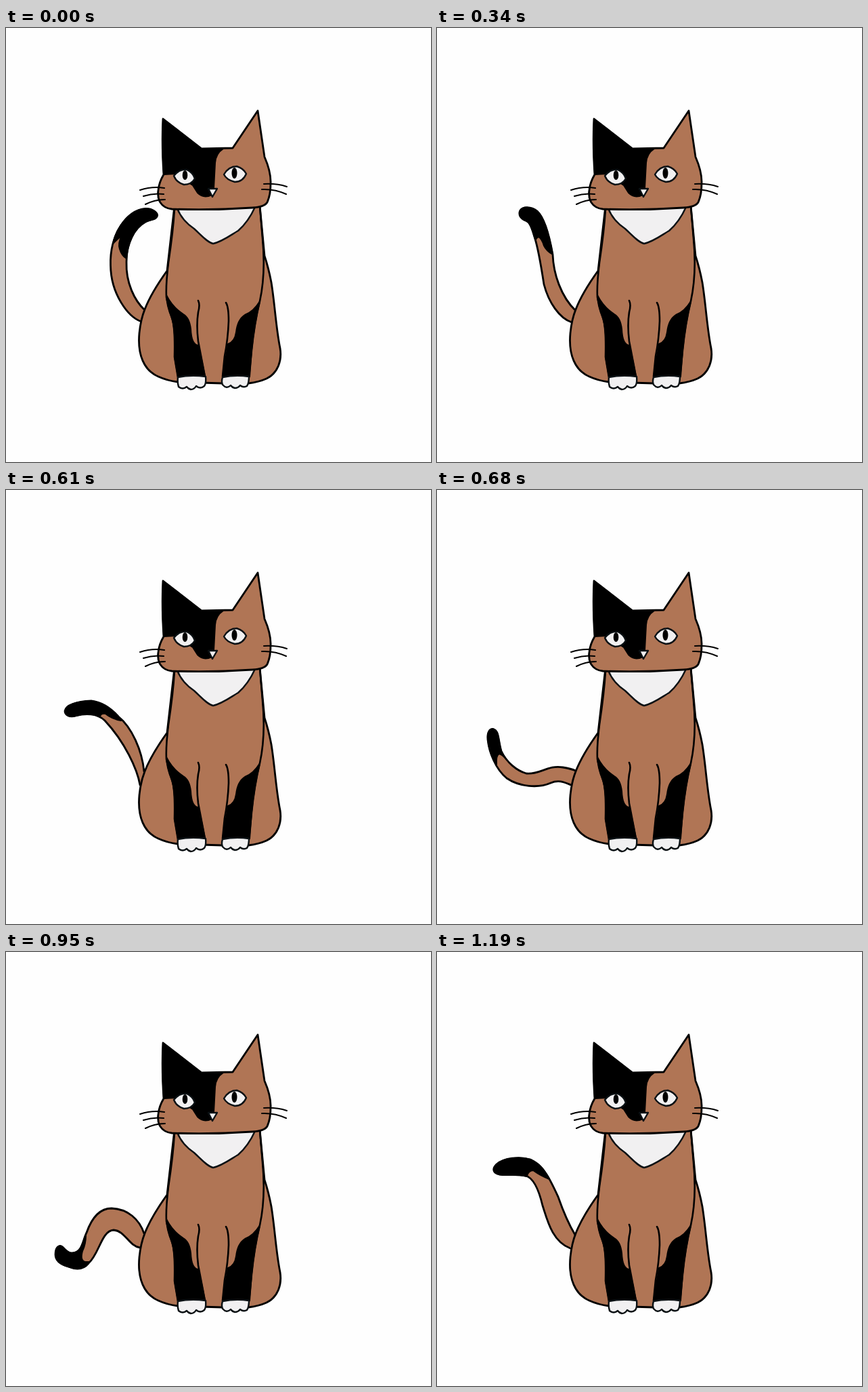
These frames come from a looping animation (628 by 640 pixels, 1360 ms). An HTML page:

```html
<!DOCTYPE html>
<html lang="en">
<head>
<meta charset="utf-8">
<title>Cat wagging its tail</title>
<style>
  html, body { margin: 0; width: 100%; height: 100%; overflow: hidden; background: #fefefe; }
  svg { display: block; width: 100%; height: 100%; }
  path { stroke-linecap: round; stroke-linejoin: round; }
  .fur { fill: #b07555; stroke: #000; stroke-width: 2.8; }
  .dark { fill: #000; stroke: #000; stroke-width: 2; }
  .white { fill: #f1f0f1; stroke: #0b1114; stroke-width: 2.4; }
  .line { fill: none; stroke: #000; stroke-width: 2.6; }
  .tail { display: none; }
</style>
</head>
<body>
<svg viewBox="0 0 628 640">
  <!-- tail poses -->
  <g class="tail">
    <path class="fur" d="M200,433 C180,426 155,392 154.500,350 C153,306 178,268 206,266.500 C216,266 224,272 223.500,277 C222,283 213,282 206,286 C188,296 178,318 178,345 C177,376 190,402 205,416"/>
    <path class="dark" d="M158,318 Q164,312 171,306 Q165,318 168,326 Q171,336 178,340 C180,318 189,296 206,286 C213,282 222,283 223.500,277 C224,272 216,266 206,266.500 C184,268 163,292 158,318Z"/>
  </g>
  <g class="tail">
    <path class="fur" d="M199,434 C181,428 165,405 158,378 C154,352 150,326 144,308 C140,294 137,286 131,284 C123,281 120,275 123,269 C127,263 139,263 148,270 C159,280 166,306 171,334 C172,362 183,396 205,417"/>
    <path class="dark" d="M145.500,313 Q147,309 150,308 Q155,311 158,321 Q162,329 171,334 C166,306 159,280 148,270 C139,263 127,263 123,269 C120,275 123,281 131,284 C137,286 140,294 145.500,313Z"/>
  </g>
  <g class="tail">
    <path class="fur" d="M198,435 C194,412 176,372 146,340 C135,329 117,329 103,333 C93,336 87,331 87,326 C88,317 104,312 126,311 C143,313 155,322 166,334 C186,350 201,384 204,415"/>
    <path class="dark" d="M139,334 Q140,329 147,330 Q157,338 170,340 L166,334 C155,322 143,313 126,311 C104,312 88,317 87,326 C87,331 93,336 103,333 C117,329 130,330 139,334Z"/>
  </g>
  <g class="tail">
    <path class="fur" d="M198,435 C188,431 180,427 168,432 C150,440 122,438 103,425 C86,411 77,386 75,368 C74,357 78,352 83,352.500 C92,355 90,368 95,385 C103,402 118,414 132,418 C152,420 164,405 186,409 Q198,411 205,414"/>
    <path class="dark" d="M88,405 Q87,391 92,389 Q98,391 104,399 Q99,394 95,385 C90,368 92,355 83,352.500 C78,352 74,357 75,368 C76,380 81,394 88,405Z"/>
  </g>
  <g class="tail">
    <path class="fur" d="M198,436 C181,433 176,411 159,410 C141,411 138,445 122,459 C113,470 102,468 92,464 C78,460 73,454 73,446 C73,436 78,432 82,434 C88,438 90,444 98,444 C113,443 113,426 119,414 C126,394 137,378 156,378 C180,379 197,394 204,415"/>
    <path class="dark" d="M118,417 Q118,431 113,441 Q109,455 117,457 L123,457 C113,470 102,468 92,464 C78,460 73,454 73,446 C73,436 78,432 82,434 C88,438 90,444 98,444 C112,443 113,428 118,417Z"/>
  </g>
  <g class="tail">
    <path class="fur" d="M198,437 C184,422 174,398 158,383 C145,372 126,372 112,379 C94,388 84,404 76,415 C70,423 63,424 60,420 C57,413 64,405 70,395 C79,378 97,359 118,354 C137,350 161,350 173,355 C191,367 203,390 205,416"/>
    <path class="dark" d="M90,369 Q91,377 83,386 Q73,396 76,402 L83,404 L76,415 C70,423 63,424 60,420 C57,413 64,405 70,395 Q78,380 90,369Z"/>
  </g>
  <g class="tail">
    <path class="fur" d="M197,437 C170,427 163,395 156,374 C151,353 143,333 131,330 C115,327 103,330 92,328 C83,326 81,320 88,313 C99,304 121,301 138,306 C158,315 168,337 179,361 C187,384 195,402 204,417"/>
    <path class="dark" d="M133,331 Q134,323 142,322 Q153,330 166,335 C158,320 152,312 138,306 C121,301 99,304 88,313 C81,320 83,326 92,328 C103,330 117,327 133,331Z"/>
  </g>

  <!-- body -->
  <path class="fur" d="M238,358 C225,376 212,397 205,415 Q199,430 197,450 C194,482 204,505 225,514 Q238,520 254,522 L320,524 L358,524 Q374,522 385,517 C402,509 408,490 405,472 C399,443 397,405 392,375 Q388,354 382,336 L375,262 H249Z"/>
  <path class="line" d="M249,267 Q247,300 240,346 Q236,378 237,397 Q240,413 246,430 Q250,445 249,485 L254,515"/>
  <path class="line" d="M375,262 L379,310 Q384,362 375,403 Q367,436 363,475 L359,515"/>
  <path class="dark" d="M237,394 Q246,412 262,422 Q271,427 273,444 Q274,467 284,468 Q288,482 294,514 H254 L249,485 Q251,447 245,428 Q237,408 237,394Z"/>
  <path class="dark" d="M375,403 Q366,418 353,423 Q342,430 340,449 Q338,463 328,466 L320,514 H360 L363,475 Q367,436 375,403Z"/>
  <path class="line" d="M284,402 Q287,408 284,419 Q281,438 284,462 L294,514 M325,405 Q329,411 329,432 Q328,459 323,484 L320,514"/>
  <path class="white" d="M254,515 Q273,511 295,514 Q296,524 293,528 Q287,533 281,528 Q278,533 273,533 Q269,532 267,529 Q261,534 255,529 Q253,523 254,515Z"/>
  <path class="white" d="M320,515 Q339,511 359,514 Q359,524 356,528 Q351,531 346,527 Q343,531 338,531 Q334,530 332,527 Q326,533 320,526 Q318,521 320,515Z"/>
  <path class="white" d="M253,266 Q260,284 278,296 C288,305 297,316 306,318 C320,315 334,304 343,299 Q358,286 368,264Z"/>

  <!-- head -->
  <path id="head" class="fur" d="M232,134 L289,178 L335,177 L372,122 Q376,150 382,190 Q392,213 391,230 Q391,246 386,257 Q382,264 364,265 Q305,269 245,267 C228,265 223,252 225,239 Q226,228 233,216 Q230,170 232,134Z"/>
  <path class="dark" d="M232,134 L289,178 H321 Q310,185 309,199 Q308,219 307,236 L300,237 L304,246 Q292,252 283,243 L276,232 L250,215 L233,216 Q230,170 232,134Z"/>
  <path class="white" d="M248,218 Q256,208 267,209 Q276,213 279,222 Q274,231 263,231 Q252,228 248,218Z"/>
  <path class="white" d="M322,216 Q329,204 341,204 Q351,207 355,215 Q350,227 338,227 Q326,224 322,216Z"/>
  <ellipse cx="264.500" cy="217" rx="3.800" ry="7"/>
  <ellipse cx="337.500" cy="214" rx="4" ry="8"/>
  <path class="white" d="M299,237 L312,237 L305,249Z"/>
  <path class="line" style="stroke-width:2" d="M198,239 Q216,233 234,236 M203,248 Q218,243 233,245 M206,260 Q220,253 235,253 M381,230 Q400,229 415,234 M378,238 Q397,237 414,245"/>
</svg>
<script>
  const tails = document.querySelectorAll(".tail");
  const STEP = 170, LOOP = 1360;

  // The curled pose holds for two steps; each other pose for one.
  function draw(ms) {
    const step = Math.floor((ms % LOOP) / STEP);
    const pose = Math.max(0, step - 1);
    tails.forEach((tail, i) => { tail.style.display = i === pose ? "inline" : "none"; });
  }

  let start;
  function tick(now) {
    start ??= now;
    draw(now - start);
    requestAnimationFrame(tick);
  }
  draw(0);
  requestAnimationFrame(tick);
</script>
</body>
</html>
```
